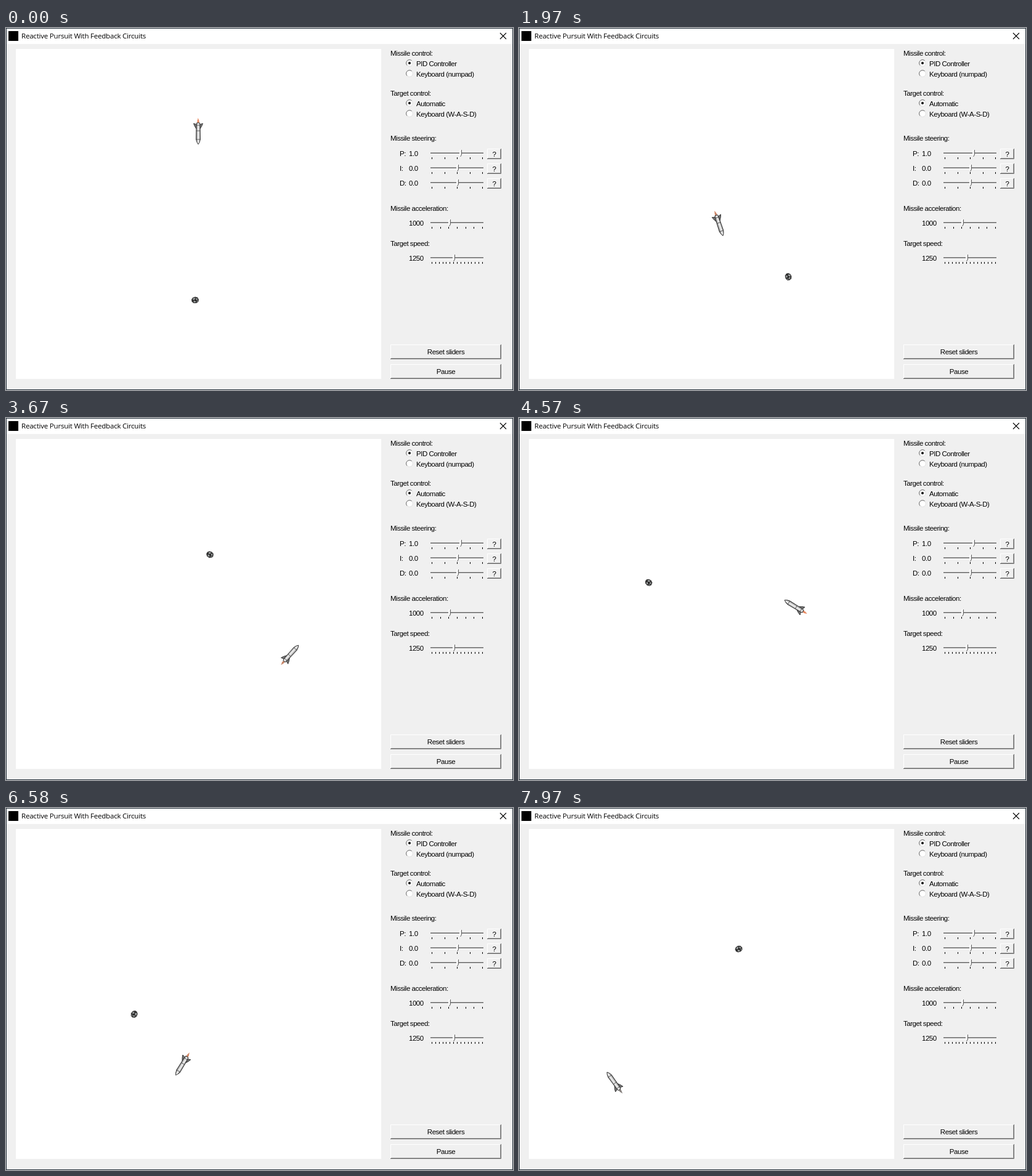
An HTML page that plays this animation: 823 by 588 pixels, repeating every 8 s.

```html
<!DOCTYPE html>
<html lang="en">
<head>
<meta charset="utf-8">
<title>Reactive Pursuit With Feedback Circuits</title>
<style>
  html, body { margin: 0; width: 100%; height: 100%; overflow: hidden; background: #f0f0f0; }
  svg { display: block; width: 823px; height: 588px; }
  .label { font: 11.5px "Liberation Sans", Arial, sans-serif; letter-spacing: -0.47px; }
  .title { font: 11.5px "Open Sans", "Noto Sans", sans-serif; letter-spacing: -0.2px; }
</style>
</head>
<body>
<svg viewBox="0 0 823 588" xmlns="http://www.w3.org/2000/svg">
  <defs>
    <linearGradient id="hull" x1="0" y1="0" x2="0" y2="1">
      <stop offset="0" stop-color="#808080"/>
      <stop offset=".4" stop-color="#f4f4f4"/>
      <stop offset=".65" stop-color="#d4d4d4"/>
      <stop offset="1" stop-color="#707070"/>
    </linearGradient>
  </defs>
  <rect width="823" height="588" fill="#f0f0f0"/>
  <rect width="823" height="26" fill="#fff"/>
  <rect x=".5" y=".5" width="822" height="587" fill="none" stroke="#26323c"/>
  <rect x="4" y="5" width="16" height="16" fill="#000"/>
  <text class="title" x="25" y="17">Reactive Pursuit With Feedback Circuits</text>
  <path d="M802 8l10 10m0-10l-10 10" stroke="#000" stroke-width="1.1"/>
  <rect x="16" y="34" width="593" height="536" fill="#fff"/>
  <g id="panel"></g>
  <g id="rock">
    <path d="M-6-1L-4-4L0-5.5L4-4.5L6-1L5.5 2.5L2 5L-2.5 5L-5.5 2.5Z" fill="#3c3c3c"/>
    <path d="M-4-2l3-2 1 2-2 2zM2-3l2 1-1 2-2-1zM-3 2l3-1 1 2-2 1zM3 1l2 0-1 2z" fill="#a4a8a8"/>
    <path d="M-1-1l2 0 1 2-2 0zM-5 0l2 1 0 2z" fill="#111"/>
  </g>
  <g id="missile">
    <path id="flame" d="M-12-1.5L-17-1.6L-22 .3L-17 1.6L-12 1.5Z"/>
    <path d="M-4-3L-9-6L-13-7.5L-11.5-3V3L-13 7.5L-9 6L-4 3Z" fill="#777" stroke="#222" stroke-width=".8"/>
    <path d="M-14-2.2L-11-3L13-3.4Q18-2.5 21 0Q18 2.5 13 3.4L-11 3L-14 2.2Z" fill="url(#hull)" stroke="#2a2a2a" stroke-width=".9"/>
    <path d="M13-3.4V3.4M-1-3.2V3.2M-10-3V3" stroke="#444" stroke-width=".8"/>
  </g>
</svg>
<script>
const $ = id => document.getElementById(id);

// ---- control panel ----
const label = (x, y, text, anchor = 'start') =>
  `<text class="label" x="${x}" y="${y}" text-anchor="${anchor}">${text}</text>`;

const line = (d, color) => `<path d="${d}" fill="none" stroke="${color}"/>`;

const radio = (y, text, on) => `
  <circle cx="655" cy="${y}" r="5" fill="#fff"/>
  ${line(`M651.2 ${y + 3.8}A5.3 5.3 0 0 1 658.8 ${y - 3.8}`, '#696969')}
  ${line(`M651.2 ${y + 3.8}A5.3 5.3 0 0 0 658.8 ${y - 3.8}`, '#e3e3e3')}
  ${on ? `<circle cx="655" cy="${y}" r="2" fill="#000"/>` : ''}
  ${label(666, y + 5, text)}`;

const choice = (y, title, ...options) =>
  label(624, y, title) + options.map((text, i) => radio(y + 12 + 17 * i, text, i === 0)).join('');

const button = (x, y, w, h, text) => `
  ${line(`M${x + .5} ${y + h}V${y + .5}H${x + w}`, '#fff')}
  ${line(`M${x + 1} ${y + h - 1.5}H${x + w - 1.5}V${y + 1}`, '#a0a0a0')}
  ${line(`M${x} ${y + h - .5}H${x + w - .5}V${y}`, '#696969')}
  ${label(x + w / 2, y + h / 2 + 4, text, 'middle')}`;

function slider(y, thumb, ticks) {
  let marks = '';
  for (let i = 0; i < ticks; i++)
    marks += `M${Math.round(691 + i * 82 / (ticks - 1)) + .5} ${y + 7}v3`;
  return `
  ${line(`M689 ${y - .5}H775`, '#a0a0a0')}
  ${line(`M689 ${y + .5}H775`, '#696969')}
  ${line(`M689 ${y + 1.5}H775`, '#fff')}
  ${line(marks, '#000')}
  <path d="M${thumb - 2} ${y - 5}h4v8l-2 3l-2-3z" fill="#f0f0f0"/>
  ${line(`M${thumb - 1.5} ${y + 4}V${y - 4.5}h3`, '#fff')}
  ${line(`M${thumb + 1.5} ${y - 5}v8l-2 3`, '#606060')}`;
}

const gain = (name, i) => {
  const y = 203 + 24 * i;
  return label(639, y + 5, name + ':') + label(654, y + 5, i ? '0.0' : '1.0') +
    slider(y, i ? 733 : 738, 5) + button(781, y - 7, 23, 17, '?');
};

const setting = (y, title, value, thumb, ticks) =>
  label(624, y, title) + label(654, y + 24, value) + slider(y + 19, thumb, ticks);

$('panel').innerHTML = [
  choice(45, 'Missile control:', 'PID Controller', 'Keyboard (numpad)'),
  choice(110, 'Target control:', 'Automatic', 'Keyboard (W-A-S-D)'),
  label(624, 183, 'Missile steering:'),
  ...['P', 'I', 'D'].map(gain),
  setting(297, 'Missile acceleration:', '1000', 720, 7),
  setting(354, 'Target speed:', '1250', 727, 15),
  button(624, 514, 180, 24, 'Reset sliders'),
  button(624, 546, 180, 24, 'Pause')
].join('');

// ---- motion ----
const LOOP = 8000, STEP = 62, SPACING = 500;

// Waypoints half a second apart; the first and last only shape the ends.
const waypoints = text => text.split(' ').map(p => p.split(',').map(Number));
const rockPath = waypoints('408,367 307,442 328,497 401,520 432,468 437,402 427,342 393,278 350,230 ' +
  '285,219 222,263 155,278 89,300 122,342 199,339 253,295 293,244 357,229 428,225');
const missilePath = waypoints('312,184 312,168 312,184 312,222 315,271 325,319 346,363 391,402 449,394 ' +
  '474,357 456,312 405,295 349,320 316,363 291,409 255,456 199,469 155,446 146,398');

// Catmull-Rom spline through the waypoints.
function along(path, t) {
  const i = Math.min(path.length - 4, Math.floor(t / SPACING));
  const u = t / SPACING - i;
  const [a, b, c, d] = path.slice(i, i + 4);
  return [0, 1].map(k => b[k] + u / 2 * (c[k] - a[k] +
    u * (2 * a[k] - 5 * b[k] + 4 * c[k] - d[k] + u * (3 * (b[k] - c[k]) + d[k] - a[k]))));
}

function render(t) {
  const n = Math.round(t / STEP), now = n * STEP;
  const [rx, ry] = along(rockPath, now);
  $('rock').setAttribute('transform', `translate(${rx} ${ry}) rotate(${n * 25})`);

  const [mx, my] = along(missilePath, now);
  const [ax, ay] = along(missilePath, now + 20);
  const heading = Math.atan2(ay - my, ax - mx) * 180 / Math.PI;
  $('missile').setAttribute('transform', `translate(${mx} ${my}) rotate(${heading})`);

  const glow = Math.abs(Math.cos(1.4 * n));
  $('flame').setAttribute('fill', `hsl(18 ${75 * glow}% ${50 + 15 * glow}%)`);
}

const begin = performance.now();
function frame() {
  render((performance.now() - begin) % LOOP);
  requestAnimationFrame(frame);
}
frame();
</script>
</body>
</html>
```
